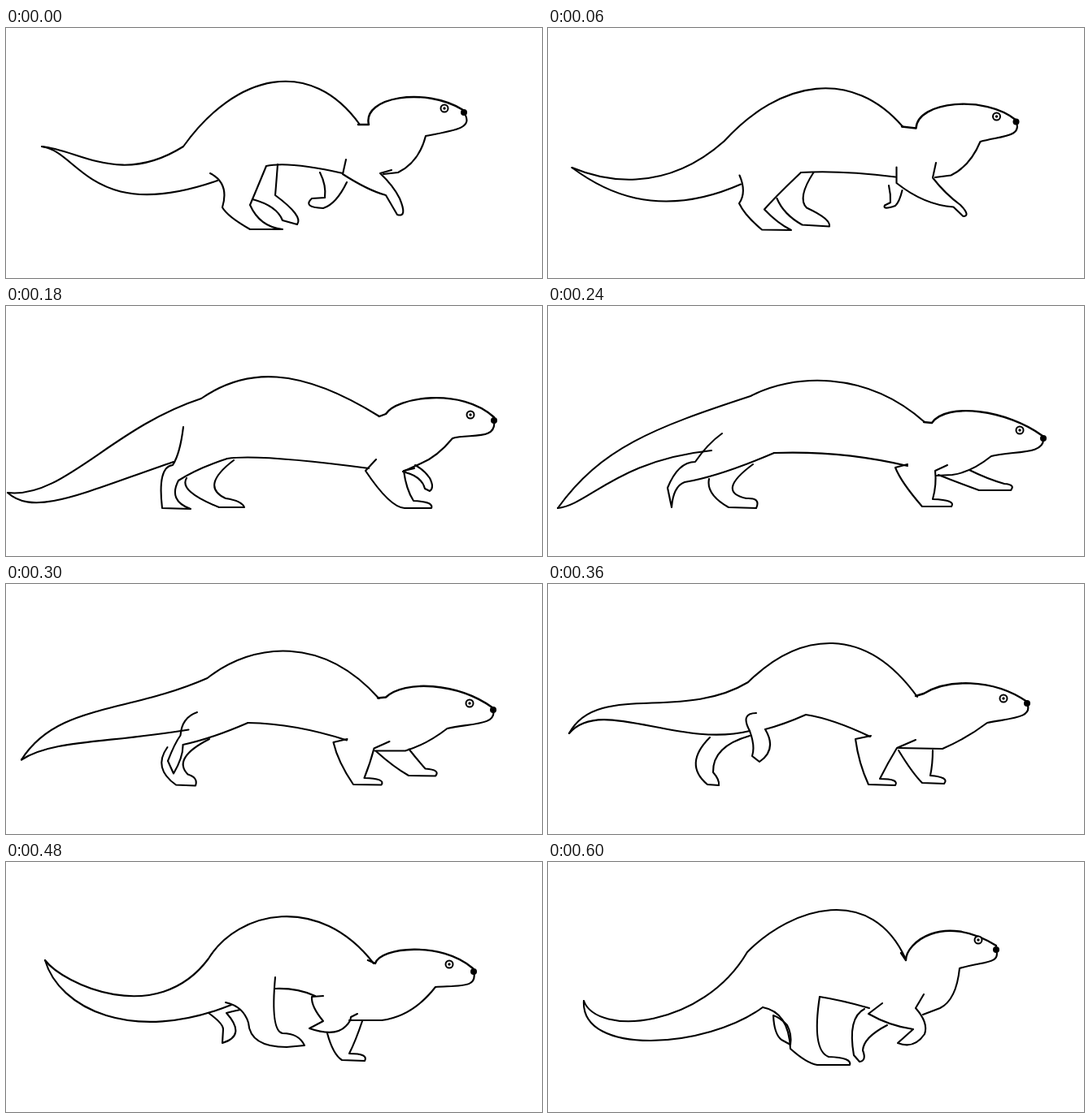
Recreate the animation shown at these times as an HTML page without scripts. Size 659x308 px, loop 660 ms.

```html
<!DOCTYPE html>
<html lang="en">
<head>
<meta charset="utf-8">
<title>Running otter</title>
<style>
html, body { margin: 0; width: 100%; height: 100%; overflow: hidden; background: #fff; }
svg { display: block; width: 659px; height: 308px; }
path {
  fill: none; stroke: #000; stroke-width: 2.1; stroke-linecap: round; stroke-linejoin: round;
  animation: run 660ms steps(2, end) infinite;
}

/* Seven key poses; long gaps get one in-between, short gaps hold */
@keyframes run {
  0% { d: var(--a); }
  18.1818% { d: var(--b); animation-timing-function: step-end; }
  27.2727% { d: var(--c); animation-timing-function: step-end; }
  36.3636% { d: var(--d); }
  54.5454% { d: var(--e); }
  72.7272% { d: var(--f); }
  90.909%, 100% { d: var(--g); animation-timing-function: step-end; }
}

.back {
  --a: path("M44 146C90 150 140 195 218 146C283 55 375 35 435 119");
  --b: path("M15 198C40 224 142 218 215 133C290 70 375 65 438 125");
  --c: path("M2 230C70 238 130 150 240 114C295 76 360 74 459 136");
  --d: path("M12 249C65 175 130 150 249 111C300 84 390 78 463 143");
  --e: path("M26 184C60 120 165 170 246 121C310 58 390 50 454 139");
  --f: path("M48 121C70 150 185 205 249 119C285 60 385 38 452 125");
  --g: path("M44 171C60 215 190 205 245 111C300 55 398 26 440 120");
}
.brow {
  stroke-width: 2.4;
  --a: path("M433 119L446 119C438 85 515 72 562 101");
  --b: path("M437 124L459 128C470 95 560 92 589 126");
  --c: path("M459 136L467 133C480 112 560 100 600 137");
  --d: path("M462 143L472 144C490 118 565 128 608 160");
  --e: path("M452 138L462 135C490 118 545 115 589 145");
  --f: path("M445 121L454 125C460 105 535 97 574 131");
  --g: path("M434 112L440 121C440 100 485 62 551 103");
}
.chin {
  --a: path("M563 104C575 123 555 126 516 133Q508 165 482 178L464 180");
  --b: path("M588 127C592 145 560 140 547 147Q530 175 509 185L488 188");
  --c: path("M600 141C604 166 570 157 549 163Q530 186 510 194L488 204");
  --d: path("M609 163C611 184 570 178 545 185Q520 205 497 208L477 209");
  --e: path("M589 147C597 165 570 165 540 171Q515 190 485 203L430 202");
  --f: path("M575 135C580 155 560 152 528 154Q500 190 462 195L422 195");
  --g: path("M551 108C557 126 535 122 506 131Q502 170 482 180L461 188");
}
.tail {
  --a: path("M44 146C90 152 105 242 260 188");
  --b: path("M15 198C40 245 160 235 214 197");
  --c: path("M2 230C35 260 95 230 206 192");
  --d: path("M12 249C50 245 85 190 201 178");
  --e: path("M26 184C65 138 160 203 248 181");
  --f: path("M48 121C65 180 155 225 277 176");
  --g: path("M44 171C40 240 195 230 264 179");
}
.belly {
  --a: path("M320 170Q348 164 414 179");
  --b: path("M302 186Q370 186 440 188");
  --c: path("M272 188Q310 182 446 200");
  --d: path("M278 181Q362 178 442 197");
  --e: path("M317 161Q350 166 396 188");
  --f: path("M331 156Q358 155 380 165");
  --g: path("M334 166Q360 170 395 180");
}
.hind {
  --a: path("M251 179Q275 191 266 221Q272 232 300 248L340 248Q312 245 300 218Q306 204 320 170");
  --b: path("M220 184Q214 214 204 211Q212 230 226 249L258 250Q252 236 232 229Q252 213 302 186");
  --c: path("M218 149Q214 182 205 196Q186 198 192 249L227 250Q199 240 212 215Q235 200 272 188");
  --d: path("M214 157Q196 170 181 192Q160 192 147 224L152 248Q154 222 168 217Q210 210 278 181");
  --e: path("M256 159Q236 159 248 181Q255 200 251 212L260 219Q282 204 267 179Q290 173 317 161");
  --f: path("M270 173Q292 178 298 198Q300 228 345 228L367 226Q360 211 340 211Q325 208 331 142");
  --g: path("M264 179Q296 185 298 230Q318 248 331 250L371 250Q374 241 345 240Q324 232 334 166");
}
.hind-far {
  --a: path("M303 211Q333 219 340 237L358 242Q366 232 331 206Q332 195 334 168");
  --b: path("M260 209Q246 240 285 248L334 247Q330 239 305 237Q280 224 319 188");
  --c: path("M222 212Q212 228 262 248L293 248Q290 240 270 237Q238 222 280 190");
  --d: path("M198 213Q194 232 222 248L256 249Q262 236 244 237Q206 229 252 195");
  --e: path("M199 189Q166 222 196 247L210 248Q211 241 203 232Q202 200 248 187");
  --f: path("M249 186Q267 199 267 206L266 223Q296 214 271 186Q278 184 288 182");
  --g: path("M277 189Q278 212 287 219L298 225Q300 212 294 201Q286 192 277 189");
}
.fore {
  --a: path("M418 162L414 180Q445 200 467 206L481 230Q494 234 484 210Q476 194 460 179L474 175");
  --b: path("M439 181L443 202Q480 236 530 235L540 234Q546 229 530 226Q500 214 486 190L480 157");
  --c: path("M455 189L442 203Q472 248 490 249L523 249Q526 241 501 240Q492 226 489 203L502 200");
  --d: path("M442 195L427 199Q434 217 460 247L496 247Q502 239 473 238Q478 220 476 203L491 196");
  --e: path("M397 187L378 191Q382 221 394 247L427 248Q432 240 408 240Q418 220 429 202L452 192");
  --f: path("M390 165L376 166Q375 178 390 196L373 205Q405 216 418 202Q424 196 424 191L432 187");
  --g: path("M411 174L394 187Q420 202 449 206L430 223Q450 231 463 212Q468 198 452 180L462 163");
}
.fore-far {
  --a: path("M386 178Q394 194 392 209L376 210Q364 221 390 222Q406 217 419 190");
  --b: path("M452 210Q449 216 450 221L452 227Q458 228 464 216Q458 212 452 210");
  --c: path("M491 205Q511 210 515 225L521 228Q527 224 521 212Q514 202 503 196");
  --d: path("M480 208Q505 218 530 227L569 227Q575 220 561 219Q540 213 518 202");
  --e: path("M431 205Q448 233 460 245L487 246Q494 238 470 236Q473 222 473 205");
  --f: path("M395 211Q402 237 413 244L441 245Q446 236 422 236Q430 220 438 196");
  --g: path("M389 181Q368 192 376 238L383 246Q392 245 387 232Q388 216 417 201");
}
/* Nose and eye are round-capped dots */
.nose {
  stroke-width: 8;
  --a: path("M563 104z");
  --b: path("M588 127z");
  --c: path("M600 141z");
  --d: path("M609 163z");
  --e: path("M589 147z");
  --f: path("M575 135z");
  --g: path("M551 108z");
}
.eye {
  stroke-width: 11;
  --a: path("M539 99z");
  --b: path("M564 119z");
  --c: path("M571 134z");
  --d: path("M580 153z");
  --e: path("M560 141z");
  --f: path("M545 126z");
  --g: path("M529 96z");
}
.white { stroke: #fff; stroke-width: 7; }
.pupil { stroke-width: 3.4; }
</style>
</head>
<body>
<svg viewBox="0 0 659 308">
  <path class="hind-far"/>
  <path class="fore-far"/>
  <path class="tail"/>
  <path class="back"/>
  <path class="belly"/>
  <path class="hind"/>
  <path class="fore"/>
  <path class="brow"/>
  <path class="chin"/>
  <path class="nose"/>
  <path class="eye"/>
  <path class="eye white"/>
  <path class="eye pupil"/>
</svg>
</body>
</html>
```
